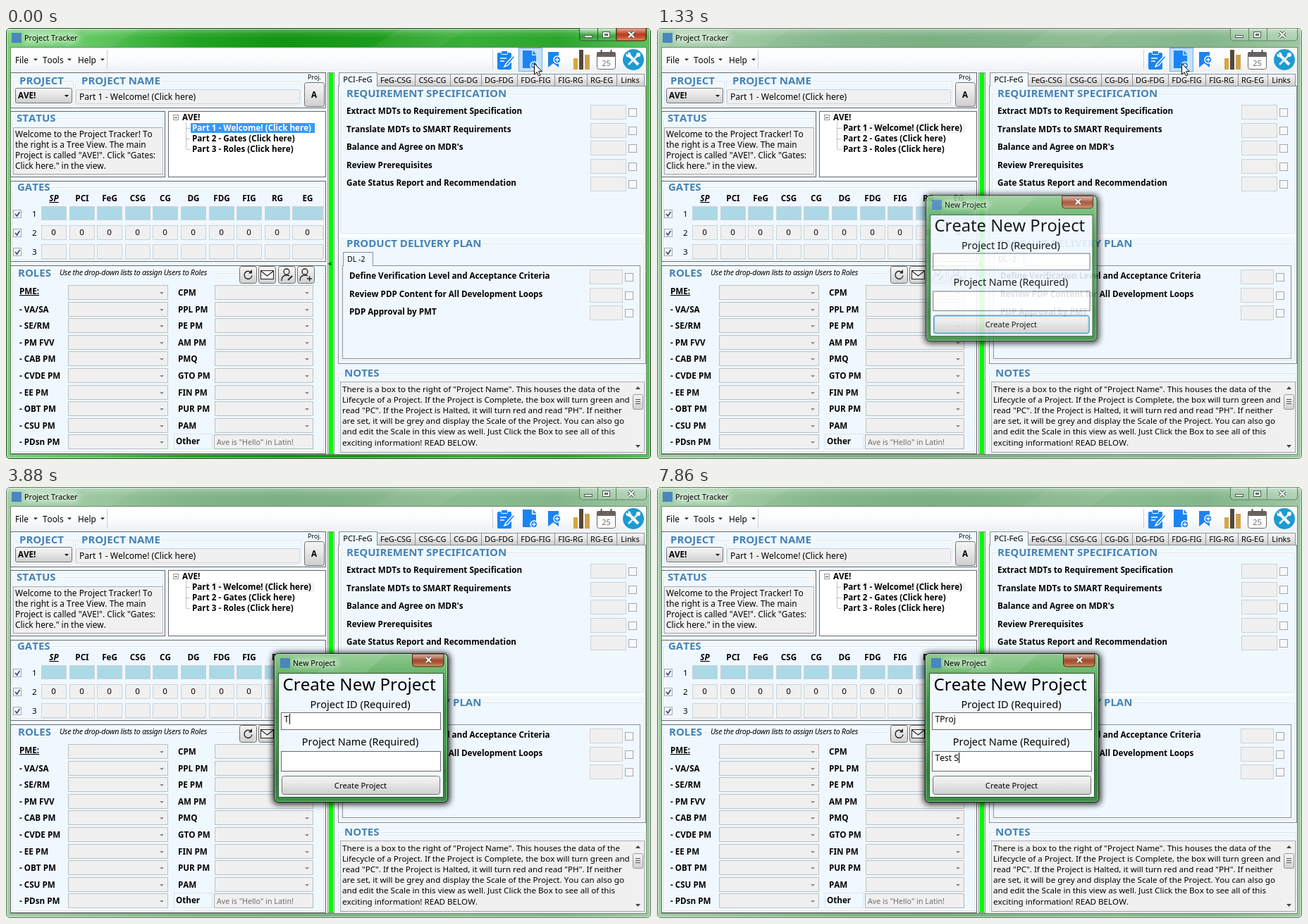
Write an HTML page that moves like this. It is 915x612 px and loops after 8000 ms.

```html
<!DOCTYPE html>
<html lang="en">
<head>
<meta charset="utf-8">
<title>Project Tracker</title>
<style>
html, body { margin: 0; width: 100%; height: 100%; overflow: hidden; background: #fff; }
svg { display: block; width: 100vw; height: 100vh; }
text { font-family: "Noto Sans", "Open Sans", sans-serif; font-kerning: none; fill: #000; white-space: pre; }
.b { font-weight: 700; }
.h { font-weight: 700; fill: #4682b4; paint-order: stroke; stroke: #f0f8ff; stroke-width: 5px; stroke-linejoin: round; }
.m { text-anchor: middle; }
.i { font-style: italic; letter-spacing: -.3px; }
.u { text-decoration: underline; }
.g { fill: #6d6d6d; }
.w { fill: #fff; }
</style>
</head>
<body>
<svg id="stage" viewBox="0 0 915 612" preserveAspectRatio="none"></svg>
<script>
const BG = '#f0f8ff', GREY = '#f0f0f0', LINE = '#696969', EDGE = '#cdd2d7', BLUE = '#1a84f2';
const stage = document.getElementById('stage');

// Drawing helpers; outlined boxes sit on the pixel grid.
const R = (x, y, w, h, fill, line, r = 0) => line
  ? `<rect x="${x + .5}" y="${y + .5}" width="${w - 1}" height="${h - 1}" rx="${r}" fill="${fill}" stroke="${line}"/>`
  : `<rect x="${x}" y="${y}" width="${w}" height="${h}" rx="${r}" fill="${fill}"/>`;
const T = (x, y, s, size = 12, cls = '') =>
  `<text x="${x}" y="${y}" font-size="${size}" class="${cls}">${s.replace(/</g, '&lt;')}</text>`;
const B = (x, y, s, cls = '') => T(x, y, s, 11.65, 'b ' + cls);
const H = (x, y, s) => T(x, y, s, 15, 'h');
const P = (d, fill = 'none', line = 'none', w = 1) =>
  `<path d="${d}" fill="${fill}" stroke="${line}" stroke-width="${w}"/>`;
const C = (x, y, r, fill, line = 'none', w = 1) =>
  `<circle cx="${x}" cy="${y}" r="${r}" fill="${fill}" stroke="${line}" stroke-width="${w}"/>`;
const group = (x, y, w, h) => R(x - 1, y - 1, w + 2, h + 2, 'none', '#fff', 3) +
  R(x, y, w, h, 'none', '#d5dfe5', 2) + R(x + 1, y + 1, w - 2, h - 2, 'none', '#fff', 1);
const down = (x, y, fill = '#222', s = 3) => P(`M${x - s} ${y}h${2 * s}l${-s} ${s}z`, fill);
const lines = (x, y, step, size, rows) => rows.map((s, i) => T(x, y + i * step, s, size)).join('');
const each = (list, f) => list.map(f).join('');
const grad = (id, stops, flat) =>
  `<linearGradient id="${id}" x2="${flat ? 1 : 0}" y2="${flat ? 0 : 1}">` +
  stops.map((c, i) => `<stop offset="${i / (stops.length - 1)}" stop-color="${c}"/>`).join('') + '</linearGradient>';
const check = (x, y, on) => R(x, y, 12, 12, '#f6f8fa', '#a4a8ac') +
  (on ? P(`M${x + 3} ${y + 6}l2.5 3 4-6`, 'none', '#3b4f83', 1.8) : '');

const defs = `<defs>
${grad('live', ['#7fd37f', '#55c355', '#22a422', '#129412', '#1c9c1c', '#37b037', '#2aa52a', '#5cc25c'], 1)}
${grad('idle', ['#a5cfa8', '#95c39a', '#82b589', '#7bb083', '#83b48a', '#8bbb91', '#84b68b', '#a0c9a4'], 1)}
${grad('shine', ['rgba(255,255,255,.35)', 'rgba(255,255,255,.1)', 'rgba(255,255,255,0)'])}
${grad('btn', ['#f4f4f4', '#ebebeb', '#dcdcdc', '#cfcfcf'])}
${grad('bar', ['#fff', '#fbfcfd', '#eef0f3'])}
${grad('red', ['#eab3a2', '#d27a63', '#b83a1f', '#c9552f', '#e59a68'])}
${grad('rust', ['#d9b0a0', '#c18b76', '#a2482c', '#b0603c', '#d0a070'])}
${grad('glass', ['rgba(255,255,255,.55)', 'rgba(255,255,255,.25)', 'rgba(0,40,0,.12)', 'rgba(255,255,255,.2)'])}
${grad('pop', ['#8fca8f', '#55a958', '#38923e', '#449f49', '#2f8436', '#3c9142'])}
<filter id="soft" x="-20%" y="-20%" width="140%" height="140%"><feGaussianBlur stdDeviation="4.5"/></filter>
<filter id="halo" x="-30%" y="-80%" width="160%" height="260%"><feGaussianBlur stdDeviation="4"/></filter>
</defs>`;

function frame(id, fill, active) {
  const glyph = active ? '#fff' : '#f7faf7', edge = active ? '#1c5a1c' : '#5e8263';
  return `<g id="${id}">` + R(0, 0, 915, 612, `url(#${fill})`, active ? '#173d17' : '#58705a', 5) +
    R(1, 1, 913, 610, 'none', 'rgba(255,255,255,.55)', 4) +
    P('M120 1h70l-40 26h-70zM560 1h95l-40 26h-95z', 'rgba(255,255,255,.06)') +
    R(1, 1, 913, 13, 'url(#shine)') +
    P('M813.5 0v14q0 4 4 4h87q4 0 4-4v-14', active ? 'url(#glass)' : 'rgba(255,255,255,.18)', edge) +
    (active ? P('M866 0h42v14q0 4-4 4h-38z', 'url(#red)', '#5a1c10') : '') +
    P('M839.5 0v18M865.5 0v18', 'none', edge) +
    R(820, 10, 12, 4, glyph, '#4b5a4d') +
    R(846, 5, 11, 9, glyph, '#4b5a4d') + R(849, 8, 5, 3, '#7da581', '#4b5a4d') +
    P('M883 5.500l8 8m0-8l-8 8', 'none', '#4b5a4d', 4) + P('M883 5.500l8 8m0-8l-8 8', 'none', glyph, 2.2) + '</g>';
}

function toolbar() {
  return R(7, 28, 901, 34, 'url(#bar)') +
    P('M143.500 31v27M690.500 31v27', 'none', '#c9ced3') +
    T(13, 50, 'File', 11.8) + T(52, 50, 'Tools', 11.8) + T(102, 50, 'Help', 11.8) +
    each([42, 90, 137], x => down(x, 43.500)) +
    `<g id="hot">${R(727, 28, 34, 34, '#c4e0f8', '#6fb0e6')}</g>` +
    R(697, 35, 20, 24, BLUE, '', 2) + R(702, 32, 10, 6, BLUE, '#fff', 1) +
    P('M701 43h9M701 47h6', 'none', '#fff', 1.5) +
    P('M720 39l-11 12-2 4 5-2 10-12z', BLUE, '#fff', 1.4) +
    P('M733 32h13v7h6v18h-19z', BLUE) + P('M747.500 32l5 5.500h-5z', BLUE) +
    C(749, 53, 5, BLUE, '#fff', 1.5) + P('M746 53h6m-3-3v6', 'none', '#fff', 1.3) +
    P('M769 34h15v22l-7.500-6-7.500 6z', BLUE) + C(782, 45, 5, BLUE, '#fff', 1.5) +
    P('M779 45h6m-3-3v6', 'none', '#fff', 1.3) +
    R(805, 43, 6, 16, '#d9a441') + R(813, 31, 6, 28, '#54483a') + R(821, 38, 7, 21, '#d0a050') +
    R(838, 34, 27, 25, '#fff', '#666', 3) + R(838, 34, 27, 7, '#6a625e', '', 2) +
    P('M844.500 31v6M858.500 31v6', 'none', '#555', 2) + T(851.500, 54, '25', 11, 'm g') +
    C(890, 45, 15, '#1d9bd1') + P('M883 38l14 14', 'none', '#fff', 4) +
    P('M897 38l-14 14', 'none', '#e8eef2', 2.6) + C(897, 38, 3, '#fff') + C(883, 38, 3.5, '#fff') +
    P('M879 36l4 2-1-4z', '#1d9bd1');
}

function project() {
  return R(6, 63, 448, 51, BG, LINE) + group(10, 75, 86, 35) + group(98, 75, 321, 35) +
    H(19, 80, 'PROJECT') + H(107, 80, 'PROJECT NAME') +
    R(13, 85, 81, 22, 'url(#btn)', '#707070', 2) + B(17, 100, 'AVE!') + down(86, 95, '#000') +
    R(99, 87, 318, 21, GREY, EDGE, 1) + T(104, 102, 'Part 1 - Welcome! (Click here)', 12.1) +
    T(428, 73, 'Proj.', 8.8) + R(423, 77, 29, 35, 'url(#btn)', '#707070', 3) + B(437, 99, 'A', 'm') +
    R(6, 118, 220, 94, BG, LINE) + group(9, 128, 214, 81) + H(15, 133, 'STATUS') +
    R(10, 141, 213, 67, GREY, '#abadb3') +
    lines(13, 155, 15.1, 11.9, ['Welcome to the Project Tracker! To', 'the right is a Tree View. The main',
      'Project is called "AVE!". Click "Gates:', 'Click here." in the view.']) +
    R(230, 118, 224, 94, '#fff', LINE) + R(237, 123, 8, 8, '#fff', '#8f9aa5') + P('M239 127.500h4', 'none', '#345') +
    B(250, 131, 'AVE!') +
    '<path d="M255.500 134v38M256 142.500h6M256 157.500h6M256 172.500h6" stroke="#888" stroke-dasharray="1 1" fill="none"/>' +
    `<g id="picked">${R(262, 135, 176, 14, '#3399ff') + B(264, 146, 'Part 1 - Welcome! (Click here)', 'w')}</g>` +
    `<g id="plain">${R(262, 135, 176, 14, '#f4f4f4') + B(264, 146, 'Part 1 - Welcome! (Click here)')}</g>` +
    B(264, 161, 'Part 2 - Gates (Click here)') + B(264, 176, 'Part 3 - Roles (Click here)');
}

function gates() {
  const names = ['SP', 'PCI', 'FeG', 'CSG', 'CG', 'DG', 'FDG', 'FIG', 'RG', 'EG'];
  const cell = (n, i) => {
    const x = Math.round(50 + i * 39.6), w = i == 9 ? 44 : 36, mid = x + w / 2;
    return `<g${i ? '' : ' font-style="italic"'}>` + B(mid, 246, n, 'm' + (i ? '' : ' u')) + '</g>' +
      R(x, 253, w, 20, '#add8e6', EDGE) + R(x, 280, w, 21, GREY, EDGE) +
      T(mid - .5, 294, '0', 11.6, 'm') + R(x, 307, w, 21, GREY, EDGE);
  };
  return R(6, 217, 448, 115, BG, LINE) + group(9, 226, 442, 103) + H(16, 231, 'GATES') +
    each(names, cell) +
    each([0, 1, 2], i => check(10, 258 + i * 27, true) + T(37, 268 + i * 27, '' + (i + 1), 11.6));
}

function roles() {
  const left = ['PME:', '- VA/SA', '- SE/RM', '- PM FVV', '- CAB PM', '- CVDE PM', '- EE PM', '- OBT PM', '- CSU PM', '- PDsn PM'];
  const right = ['CPM', 'PPL PM', 'PE PM', 'AM PM', 'PMQ', 'GTO PM', 'FIN PM', 'PUR PM', 'PAM'];
  const row = i => Math.round(365 + i * 23.6);
  const combo = (x, y, w) => R(x, y, w, 21, GREY, '#bcc1c5') + down(x + w - 9, y + 10, '#8a8a8a');
  const person = x => C(x, 346, 4, 'none', '#222', 1.3) + P(`M${x - 7} 359q0-8 7-8 3 0 4 1`, 'none', '#222', 1.3);
  return R(6, 337, 448, 268, BG, LINE) + group(9, 348, 442, 254) + H(17, 353, 'ROLES') +
    R(73, 340, 225, 14, BG) + T(76, 351, 'Use the drop-down lists to assign Users to Roles', 10.6, 'i') +
    R(328, 340, 113, 22, BG) + each([331, 358, 386, 413], x => R(x, 338, 25, 25, 'url(#btn)', '#707070', 3)) +
    P('M348 347.500a5.500 5.500 0 1 0 1 4', 'none', '#222', 1.4) + P('M349 343v5.500h-5z', '#222') +
    R(361, 344, 19, 13, '#f6f6f6', '#222') + P('M361.500 345l9 7 9-7', 'none', '#222', 1.2) +
    person(398) + P('M400 358l6-6', 'none', '#222', 2) + person(424) + P('M427 356h7m-3.500-3.500v7', 'none', '#222', 1.4) +
    each(left, (s, i) => B(19, i ? row(i) + 15 : 378, s, i ? '' : 'u') + combo(88, row(i), 142)) +
    each(right, (s, i) => B(244, row(i) + 15, s) + combo(296, row(i), 140)) +
    R(238, 576, 55, 22, BG, '#dde4ea') + B(241, 591, 'Other') +
    R(295, 577, 141, 21, GREY, '#b0b5ba') + T(299, 592, 'Ave is "Hello" in Latin!', 10.7, 'g');
}

function details() {
  const edges = [526, 580, 630, 674, 725, 778, 824, 866, 905];
  const tabs = ['FeG-CSG', 'CSG-CG', 'CG-DG', 'DG-FDG', 'FDG-FIG', 'FIG-RG', 'RG-EG', 'Links'];
  const tasks = (rows, x, y, fx, w) => each(rows, (s, i) => {
    const dy = Math.round(i * 25.5);
    return B(x, y + dy, s) + R(fx, y - 13 + dy, w, 21, GREY, EDGE) + check(fx + w + 3, y - 8 + dy);
  });
  return R(456, 63, 10, 542, '#d8e4d8', '#8a9a8a') + R(458, 64, 6, 540, '#00ff00') + T(457, 338, '<', 9, 'b') +
    each(tabs, (s, i) => R(edges[i], 65, edges[i + 1] - edges[i] + 1, 18, 'url(#btn)', '#8c8f94') +
      T((edges[i] + edges[i + 1]) / 2, 78, s, 10.9, 'm')) +
    R(471, 82, 437, 395, BG, '#8c8f94') + R(472, 63, 55, 20, BG, '#8c8f94') + R(473, 81, 53, 3, BG) +
    T(499, 77, 'PCI-FeG', 11.2, 'm') +
    group(475, 93, 430, 199) + H(483, 98, 'REQUIREMENT SPECIFICATION') +
    tasks(['Extract MDTs to Requirement Specification', 'Translate MDTs to SMART Requirements',
      "Balance and Agree on MDR's", 'Review Prerequisites', 'Gate Status Report and Recommendation'], 483, 122, 829, 51) +
    R(473, 293, 433, 4, '#fff') + group(475, 306, 430, 167) + H(483, 311, 'PRODUCT DELIVERY PLAN') +
    R(477, 337, 423, 133, BG, '#8c8f94') + R(478, 318, 43, 20, BG, '#8c8f94') + R(479, 336, 41, 3, BG) +
    T(484, 332, 'DL -2', 10.6) +
    tasks(['Define Verification Level and Acceptance Criteria', 'Review PDP Content for All Development Loops',
      'PDP Approval by PMT'], 487, 356, 828, 47) +
    group(471, 490, 436, 114) + H(480, 495, 'NOTES') + R(474, 502, 432, 101, GREY, '#abadb3') +
    lines(477, 517, 15.1, 11.6, ['There is a box to the right of "Project Name". This houses the data of the',
      'Lifecycle of a Project. If the Project is Complete, the box will turn green and',
      'read "PC". If the Project is Halted, it will turn red and read "PH". If neither',
      'are set, it will be grey and display the Scale of the Project. You can also go',
      'and edit the Scale in this view as well. Just Click the Box to see all of this',
      'exciting information! READ BELOW.']) +
    R(888, 503, 17, 99, '#f1f1f1') + P('M893 513h7l-3.500-4zM893 592h7l-3.500 4z', '#444') +
    R(889, 520, 15, 22, 'url(#btn)', '#979797', 2) + P('M893 527.500h7M893 530.500h7M893 533.500h7', 'none', '#555');
}

function dialog() {
  return '<g id="dialog">' +
    '<rect x="378" y="235" width="252" height="216" rx="8" fill="#000" opacity=".8" filter="url(#soft)"/>' +
    R(380, 236, 247, 212, 'url(#pop)', '#14261a', 6) + R(381, 237, 245, 210, 'none', 'rgba(255,255,255,.4)', 5) +
    P('M470 238h70l-30 26h-70z', 'rgba(255,255,255,.1)') +
    '<rect x="404" y="243" width="68" height="13" rx="6" fill="#dff3df" opacity=".65" filter="url(#halo)"/>' +
    R(389, 243, 14, 14, '#4a86c0') + T(407, 254, 'New Project', 10.7) +
    P('M576.500 237h44.500v14q0 4-4 4h-36.500q-4 0-4-4z', 'url(#rust)', '#4d2015') +
    P('M596 242l7 7m0-7l-7 7', 'none', '#543', 4) + P('M596 242l7 7m0-7l-7 7', 'none', '#fff', 2.2) +
    R(386, 264, 235, 177, BG, '#2f5432') +
    T(392.500, 289, 'Create New Project', 24.1) + T(502.500, 314, 'Project ID (Required)', 14.6, 'm') +
    T(502.500, 367, 'Project Name (Required)', 14.4, 'm') +
    R(390, 320, 227, 25, '#fff', LINE) + R(390, 375, 227, 29, '#fff', LINE) +
    R(391, 410, 225, 27, 'url(#btn)', '#707070', 3) +
    `<g id="ready">${R(391, 410, 225, 27, 'url(#btn)', '#3c7fb1', 3) + R(392, 411, 223, 25, 'none', '#6cc3ea', 2)}</g>` +
    T(503, 428, 'Create Project', 11.2, 'm') +
    '<text id="code" x="394.500" y="334" font-size="12"/><text id="name" x="394.500" y="389" font-size="12"/>' +
    '<rect id="caret" width="1" height="15"/></g>';
}

stage.innerHTML = defs + frame('active', 'live', true) + frame('inactive', 'idle', false) +
  '<rect x="24" y="7" width="80" height="14" rx="7" fill="#fff" opacity=".55" filter="url(#halo)"/>' +
  R(8, 7, 14, 14, '#4a86c0') + T(26, 18, 'Project Tracker', 10.7) +
  R(6, 27, 903, 579, BG, '#6f8a70') + toolbar() + project() + gates() + roles() + details() + dialog() +
  `<g id="mouse"><g id="arrow">${P('M.5.500v15.500l3.600-3.400 2.500 5.300 2.400-1.100-2.400-5.100h4.600z', '#fff', '#000')}</g>` +
  `<g id="beam">${P('M-3.500-7.500h3l.5.500.500-.500h3M-3.500 7.500h3l.5-.500.500.500h3M0-7v14', 'none', '#000')}</g></g>`;

const ui = {};
stage.querySelectorAll('[id]').forEach(el => ui[el.id] = el);
const show = (el, on) => el.setAttribute('visibility', on ? 'inherit' : 'hidden');

// Held values: [start time, ...values].
const at = (keys, t) => keys.reduce((got, k) => k[0] <= t ? k : got);

const opening = [[0, 0, 1], [1100, .12, .926], [1190, .42, .955], [1330, .89, .984], [1370, .96, .993], [1420, 1, 1]];
const path = [
  [0, 749, 50, 'arrow'], [320, 746, 50, 'arrow'], [410, 744, 50, 'arrow'],
  [1720, 735, 76, 'arrow'], [1800, 702, 146, 'arrow'], [1880, 645, 229, 'arrow'], [1950, 596, 279, 'arrow'],
  [2030, 573, 292, 'arrow'], [2110, 571, 299, 'arrow'], [2190, 570, 306, 'arrow'], [2270, 570, 312, 'arrow'],
  [2340, 573, 326, 'beam'], [2420, 573, 325, 'beam'], [2560, 573, 324, 'beam'], [2650, 573, 323, 'beam'],
  [3420, 570, 325, 'beam'], [3880, 0, 0, ''],
  [5050, 527, 320, 'beam'], [5130, 520, 324, 'beam'], [5210, 511, 331, 'beam'], [5290, 503, 337, 'beam'],
  [5360, 499, 345, 'arrow'], [5440, 498, 355, 'arrow'], [5520, 498, 366, 'arrow'],
  [5600, 500, 384, 'beam'], [5680, 500, 385, 'beam'], [5920, 500, 386, 'beam'], [6440, 0, 0, '']
];
const codeKeys = [0, 3880, 4260, 4410, 4490, 4580];
const nameKeys = [0, 6440, 6520, 6610, 6690, 6770, 7860];
const caretKeys = [[0, ''], [2880, 'code'], [3340, ''], [3880, 'code'], [5050, ''],
  [5680, 'name'], [6210, ''], [6440, 'name'], [7310, ''], [7860, 'name']];
const typed = (s, keys, t) => s.slice(0, keys.filter(k => k <= t).length - 1);

function draw(t) {
  const live = t < 1010;
  show(ui.active, live);
  show(ui.inactive, !live);
  show(ui.picked, live);
  show(ui.plain, !live);
  show(ui.hot, t < 1720);
  show(ui.ready, t < 2880);

  const [, alpha, scale] = at(opening, t), k = 1 - scale;
  ui.dialog.setAttribute('opacity', alpha);
  ui.dialog.setAttribute('transform',
    `translate(${503.5 - 40 * k} ${341.5 - 50 * k}) scale(${scale} ${1 - 1.3 * k}) translate(-503.5 -341.5)`);

  ui.code.textContent = typed('TProj', codeKeys, t);
  ui.name.textContent = typed('Test S', nameKeys, t);
  const field = at(caretKeys, t)[1];
  show(ui.caret, field);
  if (field) {
    ui.caret.setAttribute('x', Math.round(395 + ui[field].getComputedTextLength()));
    ui.caret.setAttribute('y', field === 'code' ? 322 : 377);
  }

  const [, x, y, kind] = at(path, t);
  ui.mouse.setAttribute('transform', `translate(${x} ${y})`);
  show(ui.arrow, kind === 'arrow');
  show(ui.beam, kind === 'beam');
}

const start = performance.now();
function tick() {
  draw((performance.now() - start) % 8000);
  requestAnimationFrame(tick);
}
tick();
</script>
</body>
</html>
```
